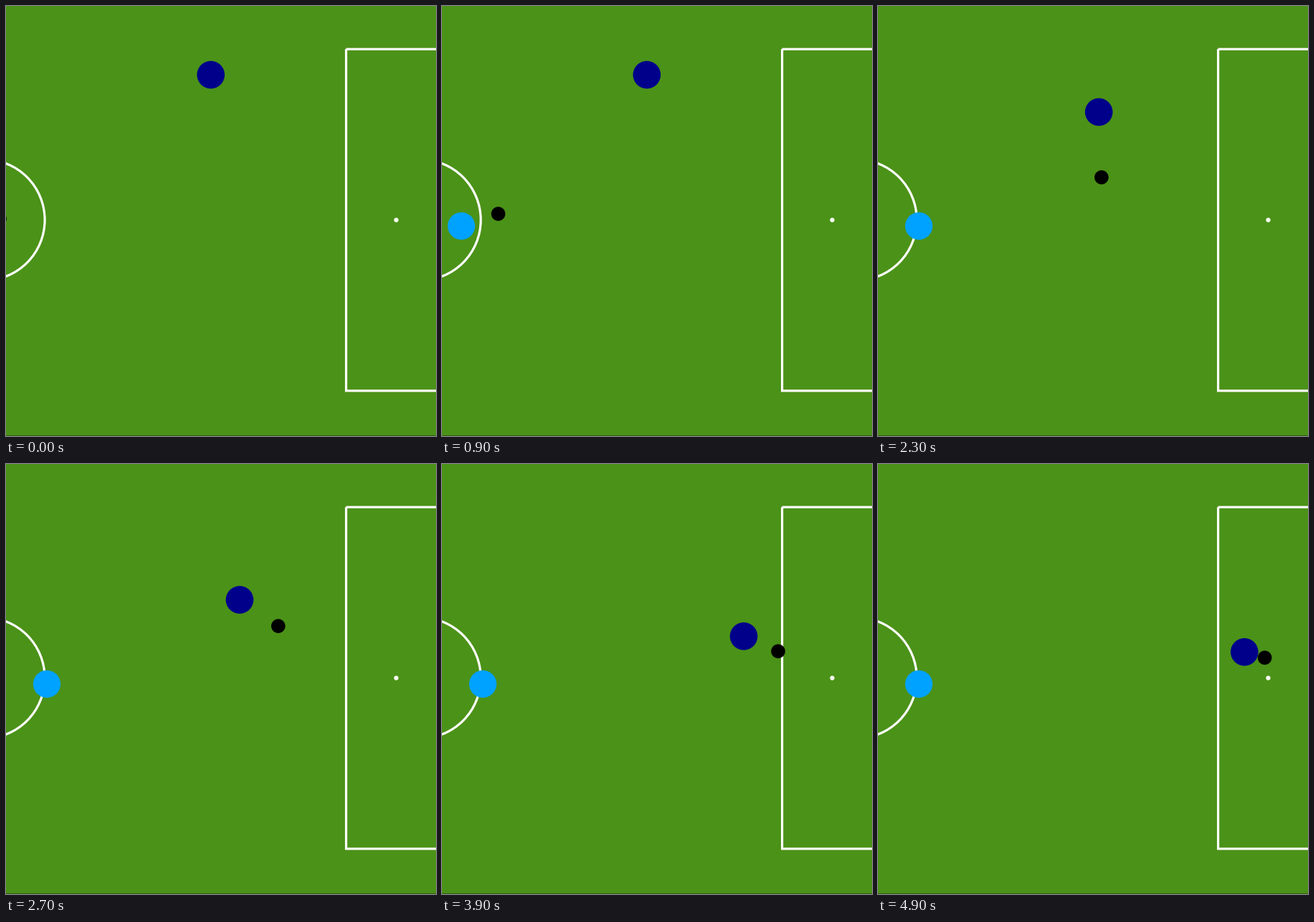
A matplotlib script for the animation above (5 s loop, 600 by 600 pixels).

```python
import numpy as np
import matplotlib.pyplot as plt
from matplotlib.animation import FuncAnimation
from matplotlib.patches import Circle, Rectangle

SIZE, DPI = 600, 100
FRAMES, INTERVAL = 50, 100
FRICTION = 5.65  # ball deceleration, px per frame squared
PASS_TIME, TURN_TIME = 18, 27

fig = plt.figure(figsize=(SIZE / DPI, SIZE / DPI), dpi=DPI, facecolor="#4b9218")
ax = fig.add_axes([0, 0, 1, 1])
ax.set_xlim(0, SIZE)
ax.set_ylim(SIZE, 0)
ax.axis("off")


def disc(radius, color, zorder=3, center=(0, 0)):
    return ax.add_patch(Circle(center, radius, fc=color, ec="none", zorder=zorder))


# Pitch markings
line = dict(fill=False, ec="white", lw=3.2 * 72 / DPI, snap=False)
ax.add_patch(Circle((-30.3, 298.5), 84.4, **line))
ax.add_patch(Rectangle((474.6, 60.2), 200, 476.7, joinstyle="miter", **line))
disc(3.2, "#f4f8f0", 1, (544.5, 298.6))
ax.add_patch(Rectangle((0, 599), SIZE, 1, fc="#2c5a10", ec="none"))

passer = disc(19.1, "#00a2ff")
receiver = disc(19.3, "#00008b")
ball = disc(9.8, "black", 4)


def passer_at(t):
    """Two straight runs with a wait between them."""
    return -33 + 8 * (np.clip(t, 0, 7.5) + np.clip(t - 12, 0, 3.75)), 307


def receiver_at(t):
    """A straight run to meet the pass, then a curve behind the ball."""
    start, turn = np.array([285.8, 96]), np.array([326, 189.5])
    bend, end = np.array([406.5, 248.3]), np.array([511.3, 262.3])
    if t < TURN_TIME:
        u = max(t - PASS_TIME, 0) / (TURN_TIME - PASS_TIME)
        return start + (turn - start) * u
    u = (t - TURN_TIME) / (FRAMES - 1 - TURN_TIME)
    return (1 - u) ** 2 * turn + 2 * u * (1 - u) * bend + u ** 2 * end


def make_kicks():
    """List every kick as (time, start, resting place)."""
    pos, kicks = np.array([-9.0, 297]), []

    def kick(time, rest):
        nonlocal pos
        kicks.append((time, pos, np.array(rest)))
        pos = kicks[-1][2]

    kick(0, (40, 295))
    kick(5, (78.5, 290))
    kick(15, (102, 279))
    kick(PASS_TIME, (383, 225.5))
    # Each dribble touch is a little longer and flatter than the last
    for i in range(3):
        angle = np.radians(30 * 0.45 ** i)
        step = (51.8 + 2 * i ** 2) * np.array([np.cos(angle), np.sin(angle)])
        kick(30.75 + 5.9 * i, pos + step)
    return kicks


KICKS = make_kicks()


def ball_at(t):
    """Slow evenly from the latest kick to its resting place."""
    time, start, rest = [k for k in KICKS if k[0] <= t][-1]
    length = np.hypot(*(rest - start))
    left = max(np.sqrt(2 * length / FRICTION) - (t - time), 0)
    return rest - (rest - start) / length * FRICTION * left ** 2 / 2


def update(frame):
    passer.center = passer_at(frame)
    receiver.center = receiver_at(frame)
    ball.center = ball_at(frame)
    return passer, receiver, ball


anim = FuncAnimation(fig, update, frames=FRAMES, interval=INTERVAL, repeat=True, repeat_delay=0)
plt.show()
```
